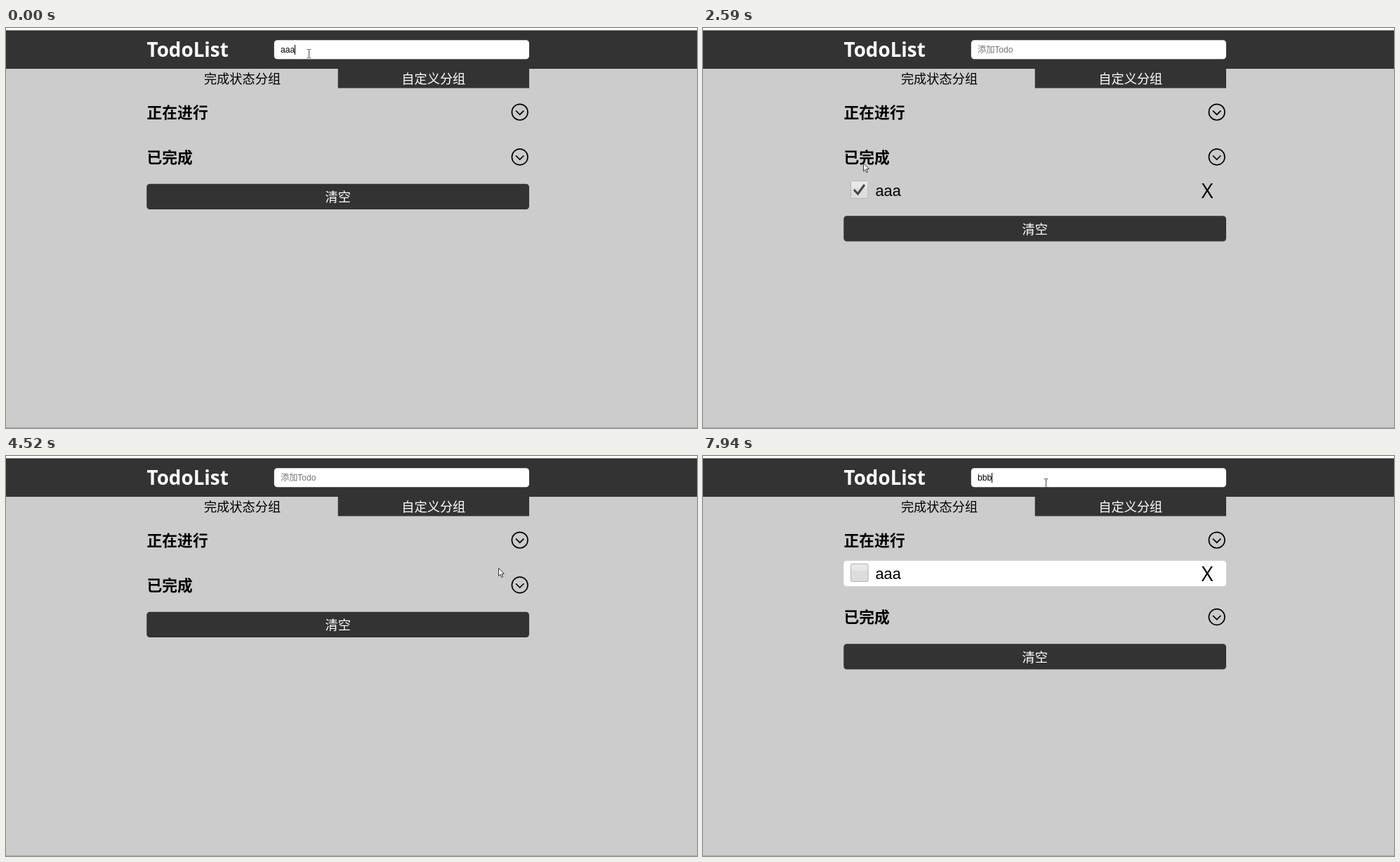
These frames come from a looping animation (984 by 569 pixels, 8000 ms). An HTML page with a canvas:

```html
<!DOCTYPE html>
<html lang="zh">
<head>
<meta charset="utf-8">
<title>TodoList</title>
<style>
html, body { margin: 0; width: 100%; height: 100%; overflow: hidden; background: #ccc; }
canvas { display: block; }
</style>
</head>
<body>
<canvas id="stage" width="984" height="569"></canvas>
<script>
const ctx = document.getElementById('stage').getContext('2d');
const LOOP = 8000;
const DARK = '#333';
const CJK = '"Noto Sans CJK SC", "Noto Sans CJK", sans-serif';
const ARIAL = '"Liberation Sans", "Noto Sans CJK SC", sans-serif';
const HUMAN = '"Open Sans", "Noto Sans", sans-serif';

// Input field: [time, text, caret visible]
const typing = [
  [0, 'aaa', true], [120, 'aaa', false], [550, '', true], [700, '', false],
  [4980, '', true], [5380, 'a', true], [5510, 'aa', true], [5640, 'aaa', true],
  [6160, 'aaa', false], [6430, '', true], [6860, '', false],
  [7270, 'b', true], [7400, 'bb', true], [7540, 'bbb', true]
];

// Place of the todo item: [time, list]
const moves = [
  [0, 'none'], [550, 'todo'], [2320, 'done'], [3010, 'todo'], [4520, 'none'], [6430, 'todo']
];

// Pointer strokes: start, step length, pointer shape, x/y pairs
const strokes = [
  [0, 120, 'beam', [431, 36, 431, 37]],
  [550, 150, 'beam', [432, 37, 433, 37]],
  [1100, 130, 'arrow', [470, 84, 545, 122, 610, 181, 490, 182, 375, 181, 300, 179, 255, 175, 231, 172]],
  [2160, 145, 'arrow', [227, 171, 227, 171, 228, 192, 229, 215, 229, 228, 229, 229]],
  [3010, 120, 'beam', [231, 231, 231.5, 229]],
  [3280, 140, 'arrow', [290, 212, 400, 200, 530, 182, 640, 168, 714, 161, 706, 160, 701, 159]],
  [4520, 155, 'arrow', [701, 159, 650, 118, 560, 72]],
  [4980, 390, 'beam', [486, 41]],
  [5760, 130, 'beam', [486, 40, 486, 41]],
  [6160, 120, 'beam', [486, 43, 486, 44]],
  [7000, 130, 'beam', [487, 41, 487.5, 37]],
  [7940, 60, 'beam', [488, 38]]
];

const latest = (list, t) => list.filter(e => e[0] <= t).pop();

function pointerAt(t) {
  const [start, step, shape, path] = latest(strokes, t);
  const i = Math.min(path.length / 2 - 1, Math.floor((t - start) / step));
  return { shape, x: path[2 * i], y: path[2 * i + 1] };
}

function rect(x, y, w, h, color) {
  ctx.fillStyle = color;
  ctx.fillRect(x, y, w, h);
}

function panel(x, y, w, h, r, color) {
  ctx.fillStyle = color;
  ctx.beginPath();
  ctx.roundRect(x, y, w, h, r);
  ctx.fill();
}

function label(text, x, y, font, color, align = 'left') {
  ctx.font = font;
  ctx.fillStyle = color;
  ctx.textAlign = align;
  ctx.fillText(text, x, y);
}

function line(points, width, color) {
  ctx.lineWidth = width;
  ctx.strokeStyle = color;
  ctx.beginPath();
  points.forEach(([x, y]) => ctx.lineTo(x, y));
  ctx.stroke();
}

function heading(text, y) {
  label(text, 200.5, y + 8.2, 'bold 21.8px ' + CJK, '#000');
  ctx.lineWidth = 1.7;
  ctx.strokeStyle = '#000';
  ctx.beginPath();
  ctx.arc(731.7, y, 11.3, 0, 7);
  ctx.stroke();
  line([[726, y - 2], [731.7, y + 3.5], [737.4, y - 2]], 1.7, '#000');
}

function checkbox(y, hover, checked) {
  const fill = ctx.createLinearGradient(0, y, 0, y + 26);
  fill.addColorStop(0, hover ? '#f0f0f0' : '#e9e9e9');
  fill.addColorStop(0.38, hover ? '#eaeaea' : '#e6e6e6');
  fill.addColorStop(0.38, hover ? '#e2e2e2' : '#dedede');
  fill.addColorStop(1, hover ? '#dedede' : '#dcdcdc');
  panel(210, y, 25.5, 26, 2, fill);
  ctx.strokeStyle = hover ? '#999' : '#b4b4b4';
  ctx.lineWidth = 1;
  ctx.beginPath();
  ctx.roundRect(210.5, y + 0.5, 24.5, 25, 2);
  ctx.stroke();
  if (checked) line([[215, y + 13], [220.5, y + 19], [230, y + 6]], 3, '#444');
}

function item(y, done, hover) {
  if (!done) panel(200.3, y, 544.7, 36.3, 4.5, '#fff');
  checkbox(y + 4, hover, done);
  label('aaa', 245.5, y + 25.5, '21.8px ' + ARIAL, '#000');
  label('X', 709.8, y + 29, '29.1px ' + HUMAN, '#000');
}

function field(t) {
  const [, text, caret] = latest(typing, t);
  const font = '12.13px ' + ARIAL;
  panel(381.8, 17.3, 363.2, 27, 4.5, '#fff');
  label(text || '添加Todo', 391, 35, font, text ? '#000' : '#757575');
  if (caret) rect(Math.round(391 + (text ? ctx.measureText(text).width : 0)), 24, 1, 14, '#000');
}

function beam(x, y) {
  ctx.save();
  ctx.globalCompositeOperation = 'difference';
  const cx = Math.floor(x);
  const top = Math.round(y - 6);
  rect(cx, top + 1, 1, 11, '#bbb');
  for (const row of [top, top + 12]) {
    rect(cx - 2, row, 2, 1, '#bbb');
    rect(cx + 1, row, 2, 1, '#bbb');
  }
  ctx.restore();
}

function arrow(x, y) {
  ctx.save();
  ctx.translate(x, y);
  ctx.beginPath();
  [[0.5, 0.5], [0.5, 11.7], [3, 9.4], [4.8, 13.6], [6.6, 12.8], [4.9, 8.7], [8.3, 8.5]]
    .forEach(([px, py]) => ctx.lineTo(px, py));
  ctx.closePath();
  ctx.fillStyle = '#fff';
  ctx.fill();
  ctx.lineWidth = 0.9;
  ctx.strokeStyle = '#222';
  ctx.stroke();
  ctx.restore();
}

function draw(t) {
  const place = latest(moves, t)[1];
  const pointer = pointerAt(t);
  const shift = place === 'none' ? 0 : 45.5;
  const over = top => pointer.shape === 'arrow' && pointer.x >= 210 && pointer.x <= 235 &&
    pointer.y >= top + 4 && pointer.y <= top + 30;

  rect(0, 0, 984, 569, '#ccc');
  rect(0, 0, 984, 4, '#fff');
  rect(0, 3.3, 984, 54.7, DARK);
  rect(0, 568, 984, 1, '#aaa');
  label('TodoList', 200.5, 41.3, 'bold 27.8px ' + HUMAN, '#fff');
  field(t);

  rect(472.7, 58, 272.3, 27.5, DARK);
  label('完成状态分组', 336.5, 79, '18.2px ' + CJK, '#000', 'center');
  label('自定义分组', 608.8, 79, '18.2px ' + CJK, '#fff', 'center');

  heading('正在进行', 119.7);
  if (place === 'todo') item(149, false, over(149));
  heading('已完成', 183.5 + (place === 'todo' ? shift : 0));
  if (place === 'done') item(213, true, over(213));

  panel(200.3, 221.8 + shift, 544.7, 36.3, 4.5, DARK);
  label('清空', 472.7, 247.4 + shift, '18.2px ' + CJK, '#fff', 'center');

  (pointer.shape === 'beam' ? beam : arrow)(pointer.x, pointer.y);
}

const began = performance.now();
function tick() {
  draw((performance.now() - began) % LOOP);
  requestAnimationFrame(tick);
}
tick();
</script>
</body>
</html>
```
